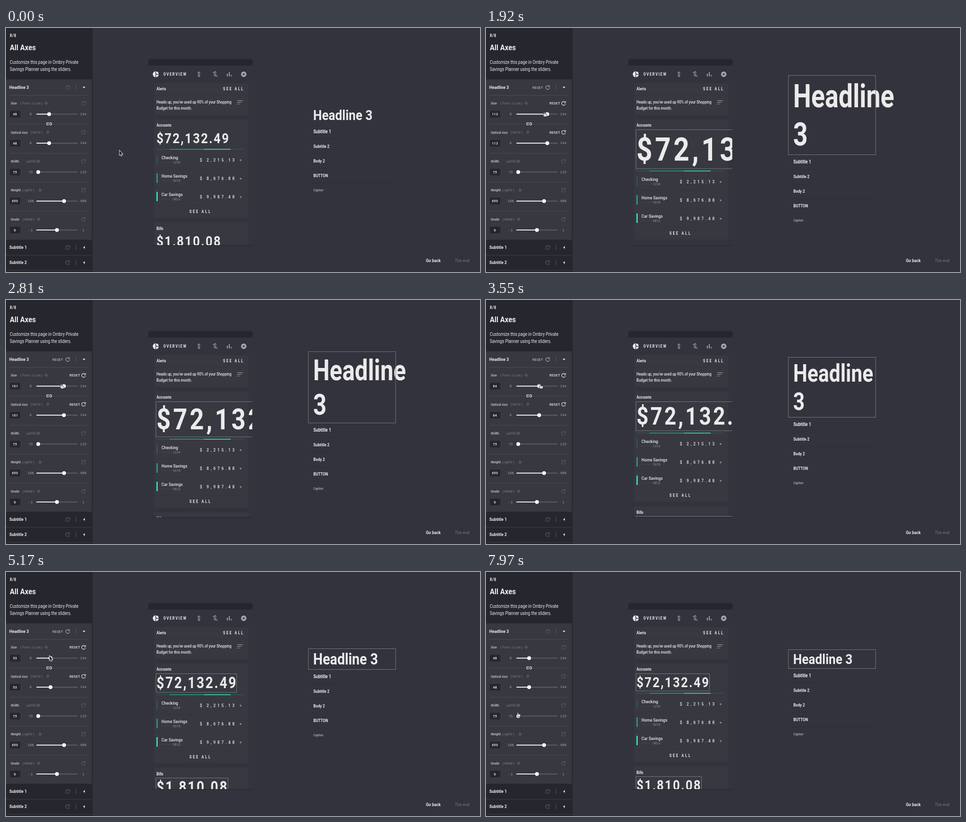
Animation, 1000 px wide and 517 px high, one loop 8 s. Source, as an HTML page with a canvas:

```html
<!DOCTYPE html>
<html lang="en">
<head>
<meta charset="utf-8">
<title>All Axes</title>
<style>
  html, body { margin: 0; width: 100%; height: 100%; overflow: hidden; background: #33333d; }
  canvas { display: block; width: 1000px; height: 517px; }
</style>
</head>
<body>
<canvas id="stage"></canvas>
<script>
const W = 1000, H = 517, LOOP = 8000, STEP = 147.55;
const BG = '#33333d', DARK = '#26272e', CARD = '#383841', LINE = '#50505a';
const WHITE = '#ebebeb', GREY = '#a9a9ae', DIM = '#5b5b64';
const SANS = 'Roboto, "Liberation Sans", sans-serif';
const MONO = '"Noto Sans Mono", "Liberation Mono", monospace';

const canvas = document.getElementById('stage');
const ctx = canvas.getContext('2d');
const dpr = window.devicePixelRatio || 1;
canvas.width = W * dpr;
canvas.height = H * dpr;

// Use the condensed face where there is one; otherwise narrow all text evenly.
const sampleWidth = stretch => {
  ctx.fontStretch = stretch;
  ctx.font = '600 100px ' + SANS;
  return ctx.measureText('Headline 72,132').width;
};
const squeeze = 0.87 * sampleWidth('normal') / sampleWidth('condensed');

// Motion keys are [step, value].
const sizeKeys = [[7, 48], [13, 113], [16, 70], [18, 102], [19, 101], [22, 64], [24, 84], [25, 99],
  [28, 66], [29, 58], [31, 95], [35, 53], [37, 53], [38, 58], [41, 86], [45, 48]];
const arriveX = [[1, 239.5], [6, 90]], arriveY = [[1, 260], [6, 178]];
const leaveX = [[45, 89], [49, 80], [51, 72], [54, 67]];
const leaveY = [[45, 178], [50, 315], [53, 288], [54, 297]];

function at(keys, k) {
  if (k <= keys[0][0]) return keys[0][1];
  for (let i = 1; i < keys.length; i++) {
    const [a, u] = keys[i - 1], [b, v] = keys[i];
    if (k <= b) return u + (v - u) * (k - a) / (b - a);
  }
  return keys[keys.length - 1][1];
}

const thumbX = size => 62.7 + size * 0.589;

function rect(x, y, w, h, color, r = 0) {
  ctx.fillStyle = color;
  ctx.beginPath();
  ctx.roundRect(x, y, w, h, r);
  ctx.fill();
}

function frame(x, y, w, h) {
  ctx.strokeStyle = '#77777e';
  ctx.lineWidth = 1;
  ctx.strokeRect(x, y, w, h);
}

function disc(x, y, r, color) {
  ctx.fillStyle = color;
  ctx.beginPath();
  ctx.arc(x, y, r, 0, 7);
  ctx.fill();
}

function stroke(path, x, y, color, width = 1) {
  ctx.save();
  ctx.translate(x, y);
  ctx.strokeStyle = color;
  ctx.lineWidth = width;
  ctx.stroke(new Path2D(path));
  ctx.restore();
}

function fill(path, x, y, color) {
  ctx.save();
  ctx.translate(x, y);
  ctx.fillStyle = color;
  ctx.fill(new Path2D(path));
  ctx.restore();
}

// Draws text centred on y by its capitals and returns its width.
function text(s, x, y, size, { weight = 600, color = WHITE, gap = 0, align = 'left', mono = false, narrow = 1 } = {}) {
  const sx = mono ? 1 : squeeze * narrow;
  ctx.save();
  ctx.translate(x, y + size * 0.35);
  ctx.scale(sx, 1);
  ctx.fontStretch = mono ? 'normal' : 'condensed';
  ctx.font = `${weight} ${size}px ${mono ? MONO : SANS}`;
  ctx.letterSpacing = gap / sx + 'px';
  ctx.textAlign = align;
  ctx.fillStyle = color;
  ctx.fillText(s, 0, 0);
  const width = ctx.measureText(s).width * sx;
  ctx.restore();
  return width;
}

function reload(x, y, color) {
  stroke('M3 -2.6A4 4 0 1 0 4 1M4.2 -4.5V-1.2H1', x, y, color, 1.1);
}

function slider([label, tag, tagX, infoX, value, min, max, pos], i, changed) {
  const y = 159.5 + i * 61.4, track = y + 23;
  const small = { mono: true, weight: 400, color: '#a2a2a8', align: 'center' };
  text(label, 10, y, 7.8, { color: '#b9b9be' });
  text(tag, tagX, y, 7.3, { mono: true, weight: 400, color: '#7d7d85' });
  stroke('M2.4 0A2.4 2.4 0 1 1 -2.4 0A2.4 2.4 0 1 1 2.4 0M0 -.4V1.4M0 -1.4V-.9', infoX, y, '#85858c', 0.7);
  reload(163.5, y, changed ? WHITE : DIM);
  if (changed) text('RESET', 134, y, 8, { weight: 500, gap: 0.4 });
  rect(8, track - 7, 22, 14, DARK, 1);
  text(value, 19, track, 7.6, { gap: 0.5, align: 'center' });
  text(min, 52, track, 7.4, small);
  text(max, 163, track, 7.4, small);
  rect(64, track - 1, 87.5, 2, DIM, 1);
  rect(64, track - 1, pos - 64, 2, WHITE, 1);
  disc(pos, track, 4, '#fff');
  if (i < 4) rect(7, y + 44, 165, 0.8, LINE);
}

function sidebar(size, changed) {
  rect(0, 0, 183, H, DARK);
  text('8/8', 8, 16, 9.3, { gap: 0.6 });
  text('All Axes', 8, 41, 17.2);
  text('Customize this page in Ombry Private', 8, 72.5, 10, { weight: 400 });
  text('Savings Planner using the sliders.', 8, 87, 10, { weight: 400 });

  rect(0, 109, 181, 339.5, CARD);
  text('Headline 3', 7, 126, 9.9);
  if (changed) text('RESET', 98, 126, 8, { weight: 400, gap: 0.4, color: '#d5d5d8' });
  reload(130, 126, changed ? GREY : DIM);
  rect(147, 120, 0.8, 12, DIM);
  fill('M-3 -1.5H3L0 1.8Z', 164.5, 126, WHITE);
  rect(7, 142, 165, 0.8, LINE);

  [
    ['Size', '(font-size)', 29, 85, size, 8, 144, thumbX(size)],
    ['Optical size', '(opsz)', 51, 88, size, 8, 144, thumbX(size)],
    ['Width', '(wdth)', 41, 69, 75, 75, 125, 68],
    ['Weight', '(wght)', 34, 72, 650, 100, 900, 122.5],
    ['Grade', '(GRAD)', 34, 69, 0, -1, 1, 107.5]
  ].forEach((row, i) => slider(row, i, changed && i < 2));

  rect(83, 199, 16, 8, CARD);
  stroke('M-1 -2.4H-3A2.4 2.4 0 0 0 -3 2.4H-1M1 -2.4H3A2.4 2.4 0 0 1 3 2.4H1M-2.5 0H2.5', 91, 203, WHITE, 1.2);

  ['Subtitle 1', 'Subtitle 2'].forEach((name, i) => {
    const y = 465 + i * 32;
    text(name, 7, y, 9.9);
    reload(130, y, DIM);
    rect(147, y - 6, 0.8, 12, DIM);
    fill('M1.7 -3V3L-1.6 0Z', 164.5, y, WHITE);
    rect(0, y + 16, 183, 0.8, '#45454d');
  });
}

function icons() {
  disc(316, 98, 6.3, WHITE);
  stroke('M0 -7V7M0 0H7', 316, 98, BG, 1.3);
  text('OVERVIEW', 332, 98, 8.5, { weight: 700, gap: 1.7 });
  const dollar = { weight: 500, color: GREY, align: 'center' };
  text('$', 407, 98, 13, dollar);
  text('$', 441, 98, 12.5, dollar);
  stroke('M-4.5 -5L5 5', 441, 98, BG, 3);
  stroke('M-4.5 -5L5 5', 441, 98, GREY, 1.2);
  stroke('M-4 -1V4.5M0 -4.5V4.5M4 1.5V4.5', 471, 98, GREY, 1.8);
  ctx.save();
  ctx.translate(501.5, 98);
  for (let i = 0; i < 4; i++) {
    rect(-1.5, -5.9, 3, 11.8, GREY, 0.5);
    ctx.rotate(Math.PI / 4);
  }
  disc(0, 0, 4.4, GREY);
  disc(0, 0, 1.9, BG);
  ctx.restore();
}

// Large sizes are drawn narrower, as an optical size axis does.
function money(s, top, h, size, framed) {
  const em = size * 0.613, gap = em * 0.08;
  const w = text(s, 317.5, top + h / 2 - 0.2, em, { gap, narrow: 1 - (size - 48) / 2000 });
  if (framed) frame(316.5, top, Math.round(w - gap + 2.5), h);
}

function phone(size, framed) {
  rect(300.5, 65.5, 220, 14, DARK, [6, 6, 0, 0]);
  icons();
  ctx.save();
  ctx.beginPath();
  ctx.rect(301, 79, 218.5, 381);
  ctx.clip();

  rect(312.5, 117, 199, 67, CARD);
  text('Alerts', 317.5, 129.5, 8.5);
  text('SEE ALL', 458, 129.5, 8.5, { weight: 700, gap: 2.4 });
  rect(312.5, 142, 199, 0.7, BG);
  text("Heads up, you've used up 90% of your Shopping", 317.5, 157, 8.55, { weight: 500 });
  text('Budget for this month.', 317.5, 170, 8.55, { weight: 500 });
  stroke('M0 -3.5H12M0 0H8.5M0 3.5H4.5', 488, 157.5, GREY, 1.2);

  const bar = Math.round(222.2 + size * 0.716), boxH = bar - 220.5;
  rect(312.5, 193.5, 199, bar + 145 - 193.5, CARD);
  text('Accounts', 317.5, 206.5, 8.5);
  money('$72,132.49', 215.5, boxH, size, framed);
  rect(317.5, bar - 0.8, 184.5, 1.6, '#31544f');
  rect(345, bar - 0.8, 73, 1.6, '#1fa578');
  rect(418, bar - 0.8, 56, 1.6, '#37e8b5');

  [
    ['Checking', '1234', '2,215.13', '#2a5a50'],
    ['Home Savings', '5678', '8,676.88', '#21a87b'],
    ['Car Savings', '9012', '9,987.48', '#37efba']
  ].forEach(([name, digits, sum, color], i) => {
    const y = bar + 18 + i * 39;
    rect(317.5, y - 6, 2.5, 20, color);
    text(name, 328, y, 9.7, { weight: 500 });
    text('······' + digits, 328, y + 10, 6.7, { mono: true, weight: 400, color: '#929298' });
    text('$ ' + sum, 409, y + 4.5, 9.5, { weight: 500, gap: 3.8 });
    text('>', 493, y + 4.5, 9, { weight: 500, color: '#c4c4c8' });
    rect(312.5, y + 23, 199, 0.7, BG);
  });
  text('SEE ALL', 387, bar + 132.5, 8.5, { weight: 700, gap: 2.7 });

  rect(312.5, bar + 155, 199, 200, CARD);
  text('Bills', 317.5, bar + 168, 8.5);
  money('$1,810.08', bar + 176.5, boxH, size, framed);
  ctx.restore();
  rect(304, 460, 216, 1.2, DARK);
}

function specimen(size, framed) {
  const lines = size > 63 ? ['Headline', '3'] : ['Headline 3'];
  const em = size * 0.613, pitch = size * 0.718;
  const h = Math.round(pitch * lines.length + 6);
  const top = Math.floor(184.7 - h / 2) + 0.5, bottom = top + h;
  lines.forEach((s, i) => {
    text(s, 648, top + 3 + pitch * (i + 0.5), em, { narrow: 1.02 - (size - 48) / 500 });
  });
  if (framed) frame(638, top, 184, h);
  text('Subtitle 1', 648.5, bottom + 15, 10);
  text('Subtitle 2', 648.5, bottom + 46.2, 9);
  text('Body 2', 648.5, bottom + 77.2, 9);
  text('BUTTON', 648.5, bottom + 108.2, 9, { weight: 700 });
  text('Caption', 648.5, bottom + 139.2, 7, { weight: 400, color: '#cfcfd2' });
  for (let i = 1; i < 5; i++) rect(638, bottom + i * 31, 184, 0.7, '#2e2e37');
}

function pointer(k) {
  let x = at(leaveX, k), y = at(leaveY, k);
  if (k < 8) {
    x = at(arriveX, k);
    y = at(arriveY, k);
  } else if (k < 45) {
    x = thumbX(at(sizeKeys, k + 0.5)) - 2;
  }
  const arrow = k < 5 || (k > 33 && k < 38) || (k > 45 && k < 51);
  if (arrow) {
    const path = 'M0 0V9L2 7.2 3.5 10.6 5 10 3.6 6.6H6.4Z';
    stroke(path, x, y, '#fff', 1.6);
    fill(path, x, y, '#18181c');
  } else {
    const path = 'M-1 1Q0 -1 1 1V4L5 4.6Q6 5 5.7 7L4.8 10H0L-3 6.5Q-3 5 -1 6Z';
    fill(path, x, y, '#fff');
    stroke(path, x, y, '#18181c', 0.8);
    stroke('M1.2 6.5V8.5M2.8 6.5V8.5', x, y, '#18181c', 0.6);
  }
}

function draw(now) {
  const k = Math.floor((now % LOOP + 1) / STEP);
  const size = Math.round(at(sizeKeys, k));
  const framed = k >= 5, changed = k >= 8 && k < 46;
  ctx.setTransform(dpr, 0, 0, dpr, 0, 0);
  rect(0, 0, W, H, BG);
  sidebar(size, changed);
  phone(size, framed);
  specimen(size, framed);
  text('Go back', 886, 493, 9.8);
  text('The end', 947, 493, 9.7, { weight: 500, color: '#686870' });
  pointer(k);
}

const start = performance.now();
(function tick() {
  draw(performance.now() - start);
  requestAnimationFrame(tick);
})();
</script>
</body>
</html>
```
